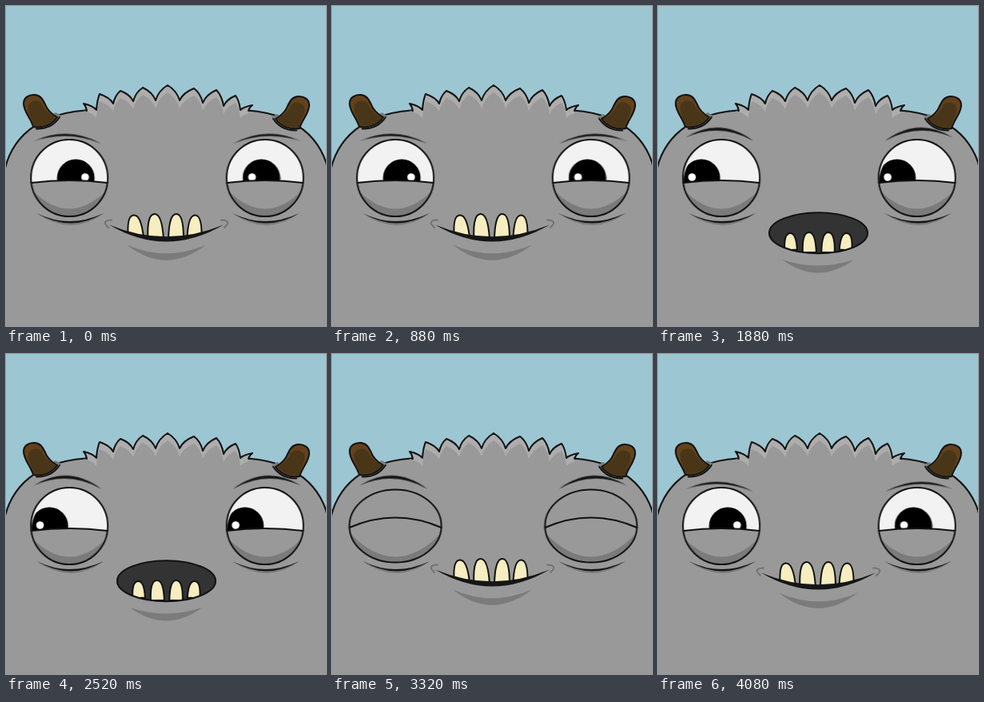
Recreate the animation shown at these times as an HTML page. Size 400x400 px, loop 4.16 s.

```html
<!DOCTYPE html>
<html lang="en">
<head>
<meta charset="utf-8">
<title>Monster</title>
<style>
  html, body { margin: 0; width: 100%; height: 100%; overflow: hidden; background: #9cc6d2; }
  svg { display: block; width: 100vw; height: 100vh; }
  .line { stroke: #111; stroke-width: 2; stroke-linejoin: round; stroke-linecap: round; }
  .skin { fill: #999; }
  .shade { fill: #7b7b7b; }
  .light { fill: #adadad; }
  .ink { fill: #151515; }
  .none { fill: none; }
  .tooth { fill: #f6edc0; }

  .head, .face, .ball, .lid, .shut, .pupil, .brow, .smile, .oh {
    animation: 4160ms step-end infinite;
  }
  .head { animation-name: head; transform-origin: 200px 400px; }
  .face { animation-name: face; }
  .ball { animation-name: ball; }
  .lid { animation-name: lid; }
  .shut { animation-name: shut; }
  .pupil { animation-name: gaze; }
  .brow { animation-name: brow; }
  .smile { animation-name: smile; }
  .oh { animation-name: oh; }

  @keyframes head {
    0%, 60.577%, 79.808%, 86.538%, 93.269% { transform: none; }
    57.692% { transform: scaleY(.992); }
    76.923%, 82.692%, 89.423% { transform: translateY(5px); }
  }
  @keyframes face {
    0%, 76.923%, 82.692%, 89.423%, 96.154% { transform: none; }
    73.077%, 79.808%, 86.538%, 93.269% { transform: translateY(-4px); }
  }
  @keyframes ball {
    0%, 21.154%, 45.192%, 60.577%, 98.077% { transform: none; }
    15.385%, 37.5%, 55.769%, 71.154%, 96.154% { transform: scale(1.1, .98); }
    17.308%, 41.346%, 57.692%, 73.077% { transform: scale(.9); }
  }
  @keyframes lid {
    0%, 17.308%, 41.346%, 57.692%, 73.077%, 98.077% { visibility: hidden; }
    15.385%, 37.5%, 55.769%, 71.154%, 96.154% { visibility: visible; }
  }
  @keyframes shut {
    0%, 21.154%, 45.192%, 60.577%, 96.154% { visibility: hidden; }
    17.308%, 41.346%, 57.692%, 73.077% { visibility: visible; }
  }
  @keyframes gaze {
    0%, 73.077% { transform: translateX(var(--x)) scaleX(var(--side)); }
    41.346% { transform: translateX(-25px) scaleX(-1); }
  }
  @keyframes brow {
    0%, 96.154% { transform: none; }
    41.346% { transform: translateY(-4px) scaleY(1.35); }
  }
  @keyframes smile {
    0%, 73.077% { visibility: visible; }
    41.346% { visibility: hidden; }
  }
  @keyframes oh {
    0%, 73.077% { visibility: hidden; }
    41.346% { visibility: visible; }
  }
</style>
</head>
<body>
<svg viewBox="0 0 400 400" preserveAspectRatio="none">
  <defs>
    <clipPath id="iris"><path d="M-47.500 6Q0 0 47.500 6A47.500 47.500 0 0 0 -47.500 6Z"/></clipPath>
    <clipPath id="gum"><path d="M130 200V275Q200 306 271 275V200Z"/></clipPath>
    <clipPath id="ohClip"><ellipse cx="200.5" cy="283.7" rx="61.5" ry="25.5"/></clipPath>
    <g id="horn">
      <path class="shade" d="M33 152Q53 158 69 137L62 133Z"/>
      <path class="line none" d="M38 153.5Q57 154 67 139"/>
      <path class="line" fill="#63421b" d="M34 151C31 140 22 132 22 122C22 114 29 110.500 36 111C44 112 46 117 49 123C52 131 57 135 64 139C58 148 47 153 34 151Z"/>
      <path fill="#493618" d="M34.500 149.500C33 140 27 134 27.500 126C29 118 40 116 45 122C49 132 56 135 62 139.500C56 147 47 151 34.500 149.500Z"/>
    </g>
  </defs>
  <rect width="400" height="400" fill="#9cc6d2"/>
  <g class="head">
    <path class="line skin" d="M-3 420V212C4 168 37 131 112 130H289C364 131 397 168 404 212V420Z"/>
    <path id="tufts" class="light"/>
    <path id="roots" class="skin"/>
    <path id="hairline" class="line none"/>
    <use href="#horn"/>
    <use href="#horn" transform="translate(401 2) scale(-1 1)"/>
    <g id="eyes"></g>
    <g class="face">
      <g class="smile">
        <path class="shade" d="M151 298.500Q200 320 250 298.500Q200 337 151 298.500Z"/>
        <g id="upperTeeth" clip-path="url(#gum)"></g>
        <path class="ink" d="M129 273.500Q200 303 272 273.500Q200 315.500 129 273.500Z"/>
        <g class="none" stroke="#737373" stroke-width="2" stroke-linecap="round">
          <path d="M132 267.500Q118 268 128 277"/>
          <path d="M269 267.500Q283 268 273 277"/>
        </g>
      </g>
    </g>
    <g class="oh">
      <path class="shade" d="M155 317Q200 332 245 317Q200 350 155 317Z"/>
      <ellipse fill="#333" cx="200.5" cy="283.7" rx="61.5" ry="25.5"/>
      <g id="lowerTeeth" clip-path="url(#ohClip)"></g>
      <ellipse class="line none" cx="200.5" cy="283.7" rx="61.5" ry="25.5"/>
    </g>
  </g>
</svg>
<script>
  const byId = id => document.getElementById(id);

  // Each spike bulges from a valley to its tip and down to the next valley.
  const tips = [[97, 122], [117, 110], [143, 106], [171, 102], [202, 99], [235, 103], [263, 105], [287, 112], [308, 124]];
  const valleys = [[101, 131], [113, 130], [134, 122], [159, 119], [187, 118], [217, 118], [246, 121], [272, 125], [293, 130], [303, 131]];
  const hair = (tipDrop, valleyDrop) => {
    const at = i => [valleys[i][0], valleys[i][1] + valleyDrop];
    return `M${at(0)}` + tips.map(([x, top], i) => {
      const [ax, ay] = at(i), [bx, by] = at(i + 1), y = top + tipDrop;
      return `Q${ax + (x - ax) * .25} ${ay + (y - ay) * .65} ${x} ${y}` +
        `Q${bx + (x - bx) * .25} ${by + (y - by) * .65} ${bx} ${by}`;
    }).join('');
  };
  byId('hairline').setAttribute('d', hair(0, 0));
  byId('tufts').setAttribute('d', hair(0, 0) + 'V142H101Z');
  byId('roots').setAttribute('d', hair(9, 10) + 'V144H101Z');

  // Eye parts are placed around the centre of the eyeball.
  const eye = (x, side, shift) => `
    <g transform="translate(${x} 215)">
      <g transform="translate(0 -44.5) scale(${side} 1)">
        <path class="brow ink" d="M-45 -1.500Q-2 -21.500 40 1.500Q-2 -16 -45 -1.500Z"/>
      </g>
      <path class="shade" d="M-41 44Q0 65 43 44Q2 74 -41 44Z"/>
      <path class="ink" d="M-41 44Q0 64 43 44Q2 69 -41 44Z"/>
      <g class="ball">
        <circle r="48" fill="#f2f2f2"/>
        <g clip-path="url(#iris)">
          <g class="pupil" style="--x:${shift}px;--side:${side}">
            <circle r="23.5" fill="#000"/>
            <circle cx="11.7" cy="-1" r="4.8" fill="#fff"/>
          </g>
        </g>
        <path class="skin" d="M-47.500 6Q0 0 47.500 6A48 48 0 0 1 -47.500 6Z"/>
        <path class="shade" d="M-45 17Q0 60 45 17A48 48 0 0 1 -45 17Z"/>
        <path class="line none" d="M-47.500 6Q0 0 47.500 6"/>
        <path class="lid line skin" d="M-44 -19Q0 -25 44 -19A48 48 0 0 0 -44 -19Z"/>
        <circle class="line none" r="48"/>
      </g>
      <g class="shut">
        <ellipse class="skin" rx="57.5" ry="45.5"/>
        <path class="shade" d="M-56 10Q0 67 56 10A57.500 45.500 0 0 1 -56 10Z"/>
        <ellipse class="line none" rx="57.5" ry="45.5"/>
        <path class="line none" d="M-57.500 2Q0 -23 57.500 2"/>
      </g>
    </g>`;
  byId('eyes').innerHTML = eye(79.2, 1, 8) + eye(323.7, -1, -4.5);

  const tooth = (x, y, w, h, tilt) => `<path class="tooth line" transform="translate(${x} ${y}) rotate(${tilt})"
    d="M${-w} ${h}C${-w} ${h * .4} ${-w * .75} 0 0 0C${w * .75} 0 ${w} ${h * .4} ${w} ${h}Z"/>`;
  byId('upperTeeth').innerHTML =
    tooth(159.5, 261.5, 9.5, 30, -6) + tooth(185.5, 260, 9.8, 34, -3) +
    tooth(213, 260, 9.5, 34, 1) + tooth(236.5, 261.5, 9, 30, 2);
  byId('lowerTeeth').innerHTML =
    tooth(165, 284, 7.8, 21, -3) + tooth(188.5, 283, 8.5, 25, -2) +
    tooth(213, 283, 8.3, 25, 1) + tooth(236, 284, 7.8, 21, 4);
</script>
</body>
</html>
```
